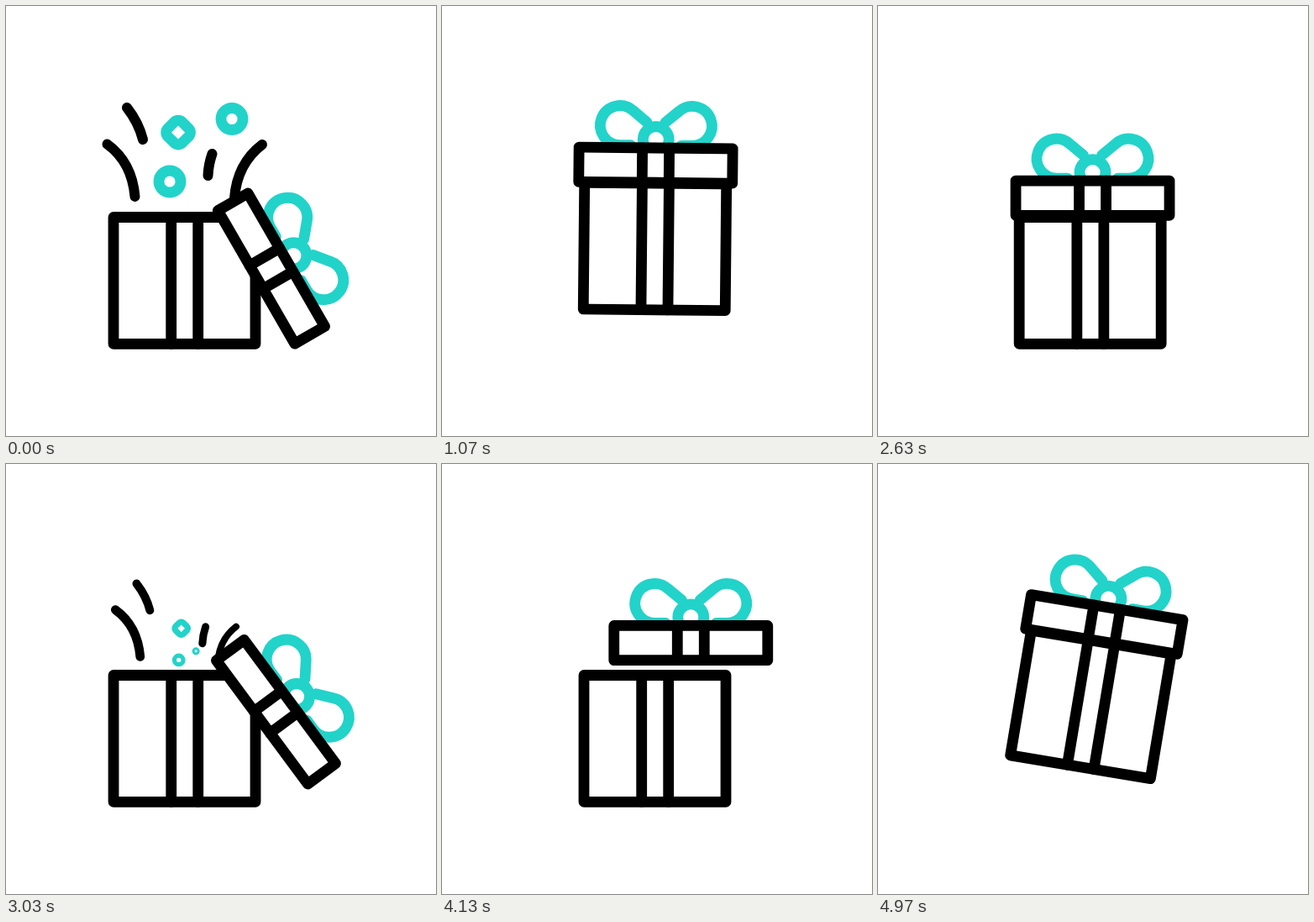
Animation of 512x512 px, one loop 5.01 s. Source, as an HTML page:

```html
<!DOCTYPE html>
<html lang="en">
<head>
<meta charset="utf-8">
<title>Gift box</title>
<style>
  html, body { margin: 0; width: 100%; height: 100%; overflow: hidden; background: #fff; }
  svg { display: block; width: 100%; height: 100%; }
  .ink { fill: none; stroke: #000; stroke-width: 12.8; stroke-linecap: round; stroke-linejoin: round; }
  .streak { stroke-width: 12; }
  .white { fill: #fff; }
  .teal { fill: none; stroke: #22d3c9; stroke-width: 12.8; stroke-linecap: round; }
</style>
</head>
<body>
<svg viewBox="0 0 512 512">
  <g id="confetti">
    <path class="ink streak" pathLength="1" d="M153.5 227Q150 186 120.5 164.5"/>
    <path class="ink streak" pathLength="1" d="M163 159Q158 139 144 121"/>
    <path class="ink streak" pathLength="1" d="M240.5 202Q241 189 245.5 176"/>
    <path class="ink streak" pathLength="1" d="M272 229Q275 188 305 165"/>
    <rect class="teal" x="193" y="138.4" width="24.2" height="24.2" rx="6.5" transform="rotate(45 205 150.5)"/>
    <circle class="teal" cx="195" cy="209" r="13"/>
    <circle class="teal" cx="269" cy="134.5" r="13"/>
  </g>
  <g id="gift">
    <g id="box">
      <path class="ink white" d="M169 251.5H338V402.3H169Z"/>
      <path class="ink" d="M237.7 251.5V402.3M269.7 251.5V402.3"/>
    </g>
    <g id="lid">
      <g class="teal">
        <path d="M-11 -51L-27.3 -64.5A23.5 23.5 0 1 0 -43 -23.5H-30"/>
        <path d="M11 -51L27.3 -64.5A23.5 23.5 0 1 1 43 -23.5H30"/>
        <circle class="white" cy="-30.5" r="15.5"/>
      </g>
      <path class="ink white" d="M-91.5 -20.5H91.5V20.7H-91.5Z"/>
      <path class="ink" d="M-16 -20.5V20.7M16 -20.5V20.7"/>
    </g>
  </g>
</svg>
<script>
  const LOOP = 5010, REPEAT = 3620, OPEN = 2590;
  const MOUTH = [213, 250], REST = [253.5, 230];
  const OPENING = [[0, 0], [50, -35], [88, 20], [62.5, 82.5]];
  const CLOSING = [[62.5, 82.5], [112, -10], [74, -42], [0, 0]];
  const byId = id => document.getElementById(id);
  const [gift, box, lid] = ['gift', 'box', 'lid'].map(byId);

  const clamp = x => Math.min(1, Math.max(0, x));
  const span = (t, from, to) => clamp((t - from) / (to - from));
  const ease = (t, from, to) => (1 - Math.cos(Math.PI * span(t, from, to))) / 2;

  // Eased value between [time, value] keys
  function track(t, keys) {
    return keys.slice(1).reduce((v, [time, value], i) =>
      v + (value - keys[i][1]) * ease(t, keys[i][0], time), keys[0][1]);
  }

  function bezier(s, points) {
    const r = 1 - s, w = [r * r * r, 3 * r * r * s, 3 * r * s * s, s * s * s];
    return [0, 1].map(axis => points.reduce((sum, p, i) => sum + w[i] * p[axis], 0));
  }

  // Slight overshoot that settles at 1
  function pop(p) {
    const r = 1 - p;
    return 1 - r * r * r + 0.02 * Math.sin(Math.PI * clamp(p * 2 - 1));
  }

  const pieces = [...byId('confetti').children].map((node, i) => {
    const group = document.createElementNS('http://www.w3.org/2000/svg', 'g');
    node.replaceWith(group);
    group.append(node);
    return { node, group, streak: node.tagName === 'path', enter: 2780 + 35 * i, leave: i === 4 ? 0 : 55 };
  });

  function drawConfetti(t) {
    const arriving = t >= OPEN;
    for (const { node, group, streak, enter, leave } of pieces) {
      const shown = arriving ? span(t, enter, enter + 480) : 1;
      const gone = arriving ? 0 : ease(t, leave, leave + 270);
      const scale = pop(shown);
      const [x, y] = MOUTH;
      const drift = streak ? 0 : -25 * gone;
      group.setAttribute('transform',
        `translate(${x} ${y + drift}) scale(${scale}) translate(${-x} ${-y})`);
      group.style.display = shown > 0 && gone < 1 ? '' : 'none';
      if (streak) {
        node.style.strokeDasharray = gone ? `${1 - gone} 2` : 'none';
        node.style.strokeDashoffset = -gone;
      } else {
        group.style.opacity = 1 - gone * gone;
      }
    }
  }

  function draw(time) {
    const t = time >= REPEAT ? time - REPEAT : time;
    const rise = track(t, [[650, 0], [1030, -40.5], [2160, -40.5], [2600, 0]]);
    const tilt = track(t, [[1010, 0], [1410, 10], [1930, -10], [2340, 8.5], [2570, 0]]);
    const slide = track(t, [[0, -41], [455, 0], [OPEN, 0], [3040, -41]]);
    const swing = track(t, [[0, 60], [455, 0], [2630, 0], [3140, 60]]);
    const [dx, dy] = t < OPEN ? bezier(ease(t, 0, 740), CLOSING)
                              : bezier(ease(t, OPEN, 3140), OPENING);

    gift.setAttribute('transform', `translate(0 ${rise}) rotate(${tilt} 253.5 326.5)`);
    box.setAttribute('transform', `translate(${slide} 0)`);
    lid.setAttribute('transform', `translate(${REST[0] + dx} ${REST[1] + dy}) rotate(${swing})`);
    drawConfetti(t);
  }

  const start = performance.now();
  function tick() {
    draw((performance.now() - start) % LOOP);
    requestAnimationFrame(tick);
  }
  tick();
</script>
</body>
</html>
```
